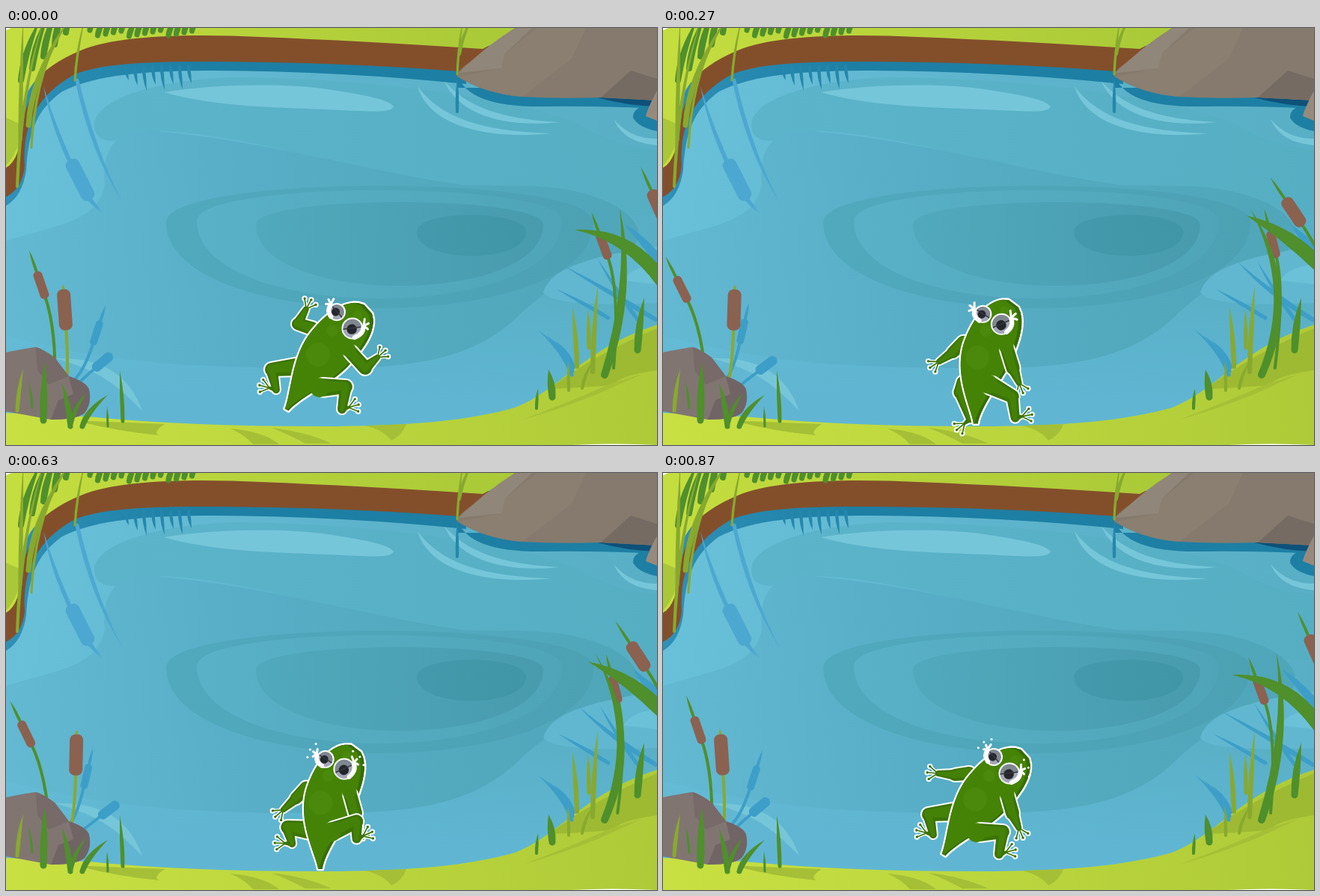
Write an HTML page with a canvas that moves like this. It is 870 px wide and 558 px high and loops after 900 ms.

```html
<!DOCTYPE html>
<html lang="en">
<head>
<meta charset="utf-8">
<title>Frog at the pond</title>
<style>
html, body { margin: 0; width: 100%; height: 100%; overflow: hidden; }
canvas { display: block; }
</style>
</head>
<body>
<canvas id="stage" width="870" height="558"></canvas>
<script>
const W = 870, H = 558, LOOP = 900, STEP = 30, LAST = LOOP - STEP;
const LEAF = '#4f8f2c', OLIVE = '#88a92f', CATTAIL = '#8b6150', MIRROR = '#3d9fc8', FAINT = '#4ca8d1';
const RAD = Math.PI / 180;
const stage = document.getElementById('stage').getContext('2d');
let g = stage;

const mix = (a, b, k) => a + (b - a) * k;
const mixAll = (a, b, k) => a.map((v, i) => mix(v, b[i], k));
const polar = (x, y, r, a) => [x + r * Math.cos(a), y + r * Math.sin(a)];
const ease = (from, to, t) => {
  const u = Math.min(1, Math.max(0, (t - from) / (to - from)));
  return u * u * (3 - 2 * u);
};

function ramp(x0, y0, x1, y1, ...colors) {
  const grad = g.createLinearGradient(x0, y0, x1, y1);
  colors.forEach((c, i) => grad.addColorStop(i / (colors.length - 1), c));
  return grad;
}

function fill(d, color) {
  g.fillStyle = color;
  g.fill(new Path2D(d));
}

function disc(x, y, r, color) {
  g.fillStyle = color;
  g.beginPath();
  g.arc(x, y, r, 0, 7);
  g.fill();
}

function curve(x, y, cx, cy, tx, ty, w, color) {
  g.strokeStyle = color;
  g.lineWidth = w;
  g.lineCap = 'round';
  g.beginPath();
  g.moveTo(x, y);
  g.quadraticCurveTo(cx, cy, tx, ty);
  g.stroke();
}

// Leaf with a round base, a full belly and a sharp tip.
function blade(x, y, cx, cy, tx, ty, w, color) {
  const a = Math.atan2(cy - y, cx - x), b = Math.atan2(ty - y, tx - x) + Math.PI / 2;
  const dx = Math.cos(b) * w * .75, dy = Math.sin(b) * w * .75;
  g.fillStyle = color;
  g.beginPath();
  g.arc(x, y, w / 2, a + Math.PI / 2, a - Math.PI / 2);
  g.quadraticCurveTo(cx - dx, cy - dy, tx, ty);
  g.quadraticCurveTo(cx + dx, cy + dy, ...polar(x, y, w / 2, a + Math.PI / 2));
  g.fill();
}

const grass = (x, y, height, lean, w, color) =>
  blade(x, y, x + lean * .2, y - height * .5, x + lean, y - height, w, color);

function capsule(x, y, w, h, deg, color) {
  g.save();
  g.translate(x, y);
  g.rotate(deg * RAD);
  g.fillStyle = color;
  g.beginPath();
  g.roundRect(-w / 2, -h / 2, w, h, w * .42);
  g.fill();
  g.restore();
}

// Depth contour: a shallow arch above y and a deep bowl below it.
function pool(left, right, y, top, bottom, from, to) {
  const up = y - (y - top) / .75, down = y + (bottom - y) / .75;
  fill(`M${left} ${y}C${left} ${up} ${right} ${up} ${right} ${y}C${right} ${down} ${left} ${down} ${left} ${y}Z`,
    ramp(left, 0, right, 0, from, to));
}

function drawWater() {
  g.fillStyle = ramp(0, 100, 870, 300, '#6ac1da', '#5cb3cb', '#58afc5');
  g.fillRect(0, 0, W, H);
  g.fillStyle = ramp(0, 360, 0, 500, '#60b6d200', '#60b6d2');
  g.fillRect(0, 360, W, 198);
  fill('M118 130C118 95 200 70 300 66C500 66 690 98 760 126C800 150 830 158 870 163V250H640C500 200 350 145 210 138C170 137 165 151 140 151C125 150 118 142 118 130Z',
    ramp(118, 0, 870, 0, '#5cb4cb', '#56aec3'));
  fill('M0 285C65 264 125 260 132 208C126 150 160 130 210 139C350 152 500 195 610 210C690 213 740 205 805 233C860 260 850 290 825 305C750 330 725 350 690 380C630 442 550 456 420 455C240 455 140 448 0 412Z',
    ramp(0, 300, 850, 220, '#63b8d2', '#59afc8', '#53a9be', '#4fa6b9'));
  pool(214, 785, 260, 211, 375, '#51a9be', '#4ca1b3');
  pool(255, 743, 258, 217, 362, '#59b1c8', '#4fa5b7');
  pool(334, 718, 263, 233, 345, '#51a9bd', '#489bad');
  pool(549, 695, 273, 250, 305, '#449aac', '#4095a6');
  fill('M718 354C728 318 790 305 870 292V368Q730 374 718 354Z', '#61b7d0');
  fill('M825 338Q835 320 870 316V343Q845 340 825 338Z', '#6bc1d8');

  const glint = '#76c6d9';
  fill('M211 86C280 74 380 74 430 82C490 91 512 97 518 105C515 114 490 112 430 109C340 106 270 103 211 86Z', glint);
  fill('M550 78C580 118 630 138 728 141C640 150 565 130 550 78Z', glint);
  fill('M585 70C615 105 660 122 740 126C665 134 605 116 585 70Z', glint);
  fill('M812 122C828 140 845 148 870 148V157C840 154 822 144 812 122Z', glint);
  fill('M66 442C130 440 165 465 182 512C150 480 130 460 66 442Z', glint);
}

function drawFarShore() {
  const deep = '#1d7fa4';
  fill('M0 238Q22 225 27 190C30 140 40 110 75 85C120 62 190 57 280 57Q450 58 615 75V40H0Z', ramp(0, 0, 250, 0, '#2f91b8', deep));
  fill('M603 64C615 92 650 106 720 105Q790 104 870 108V80H603Z', deep);
  fill('M870 100Q837 104 838 120Q845 133 870 138Z', deep);
  fill('M790 93Q830 104 870 105V90Z', '#0e5179');
  for (let i = 0; i < 8; i++) grass(160 + i * 12, 52, -18 - i * 7 % 15, 4, 4, '#2687ad');
  fill('M0 226Q22 215 25 185C22 130 40 92 90 63C130 45 210 45 280 45Q450 46 605 58H690L640 20L300 0L60 20L0 180Z', '#834f2b');
  fill('M0 187Q20 176 22 125C17 90 40 55 100 30C150 8 260 8 340 12Q470 17 637 28L690 0H0Z',
    ramp(0, 0, 690, 0, '#c5de3f', '#b6d23b', '#a9c937'));
  fill('M0 120Q18 128 22 130Q18 165 0 184Z', '#a9c737');

  blade(98, 205, 65, 140, 50, 78, 5, FAINT);
  blade(103, 215, 111, 230, 128, 247, 6, FAINT);
  capsule(99, 203, 19, 60, -27, FAINT);
  blade(95, 70, 116, 165, 155, 232, 5, FAINT);
  grass(603, 112, 46, 0, 4, '#2687ad');

  fill('M603 61Q608 53 625 42L680 0H870V97L795 93Q740 95 690 92Q640 88 603 65Z', '#857a6d');
  fill('M605 60Q640 25 680 0H703L667 34L662 54Z', '#91867a');
  fill('M662 54L667 34L710 0H775L756 41L690 92Q640 88 605 65Z', '#8a7f71');
  fill('M795 93L835 57L870 68V97Z', '#756b62');
  fill('M855 118Q857 108 870 84V124Z', '#978a7d');

  for (let i = 0; i < 14; i++) grass(112 + i * 10.5, 3 + i * 7 % 9, 22, 10, 7, LEAF);
  for (let i = 0; i < 5; i++) grass(20 + i * 15, 70 - i * 16, 82 - i * 10, 26 - i * 4, 8, LEAF);
  blade(15, 212, 20, 80, 52, -15, 4, OLIVE);
  blade(30, 130, 35, 60, 90, -20, 7, OLIVE);
  blade(34, 160, 38, 70, 72, 10, 3, OLIVE);
  grass(19, 150, 160, 4, 5, OLIVE);
  grass(92, 70, 85, 14, 3, OLIVE);
  grass(603, 62, 75, 8, 3, OLIVE);
  grass(606, 35, 50, 18, 4, OLIVE);
}

function drawNearShore() {
  fill('M0 515Q60 518 110 520Q240 533 420 533C540 533 620 525 680 508C740 485 770 430 870 397V558H0Z',
    ramp(0, 540, 870, 470, '#c9e042', '#bbd63d', '#aeca38'));
  const shade = '#a5bf36';
  fill('M725 483Q790 435 870 402V458Q820 465 810 478Q760 482 725 483Z', '#9dba32');
  fill('M690 524Q750 502 810 475L850 463L790 490Q740 510 690 524Z', shade);
  fill('M110 526L212 530Q195 541 205 545Q150 540 100 527Z', shade);
  fill('M300 536Q345 540 365 557H330Q320 545 300 536ZM355 535Q400 540 435 556H400Q380 545 355 535ZM480 532L535 530Q530 545 515 552Q505 538 480 532Z', shade);
  fill('M755 558Q810 555 870 558ZM0 0H7L0 3Z', '#fff');
  for (let i = 0; i < 3; i++) grass(756 + i, 464 - i * 5, 60 - i * 12, -45 + i * 10, 5, MIRROR);
}

function drawFrontGrass() {
  fill('M0 434Q30 428 40 427Q50 430 65 441L84 466Q108 474 111 484Q115 502 105 515Q95 524 60 524L0 513Z', '#817572');
  fill('M40 427Q50 430 65 441L84 466L57 477L42 458Z', '#776a68');
  fill('M84 466Q108 474 111 484Q115 502 105 515Q95 524 60 524L70 498L90 490Z', '#716465');
  grass(15, 512, 56, 8, 5, OLIVE);
  grass(50, 525, 78, 2, 9, LEAF);
  grass(35, 508, 36, -5, 3, LEAF);
  grass(86, 533, 58, -11, 7, LEAF);
  grass(102, 533, 42, 34, 7, LEAF);
  grass(87, 530, 42, 20, 5, LEAF);
  grass(156, 526, 68, -4, 5, LEAF);
  grass(136, 533, 27, -1, 3, LEAF);

  grass(763, 453, 80, -6, 6, OLIVE);
  grass(784, 460, 116, 7, 6, OLIVE);
  grass(779, 428, 51, -1, 5, OLIVE);
  grass(752, 485, 40, -1, 4, OLIVE);
  grass(770, 482, 37, 15, 4, OLIVE);
  grass(844, 431, 70, 9, 9, LEAF);
  grass(730, 494, 37, -5, 9, LEAF);
  grass(709, 509, 27, 2, 4, LEAF);
}

// The head drifts sideways, tilts with the drift and pulls its stem along.
function cattail(x, y, w, h, tilt, spike, rootX, rootY, drift, stem, color = CATTAIL) {
  const deg = tilt + drift * .35, ux = -Math.sin(deg * RAD), uy = Math.cos(deg * RAD);
  x += drift;
  y += drift * Math.sin(deg * RAD) * .6;
  const along = d => [x + ux * d, y + uy * d];
  curve(...along(h / 2 - 4), ...along(h / 2 + 45), rootX + drift * .35, rootY, 4, stem);
  blade(...along(4 - h / 2), ...along(-h / 2 - spike / 2), ...along(-h / 2 - spike), 3.5, stem);
  capsule(x, y, w, h, deg, color);
}

function drawReeds(s) {
  cattail(121, 408, 10, 34, 18, 22, 85, 475, -18 * s, MIRROR, MIRROR);
  cattail(129, 447, 13, 32, 50, 1, 88, 490, 11 * s, MIRROR, MIRROR);
  blade(868, 390, 810, 355, 745 + 28 * s, 318 - 6 * s, 6, MIRROR);
  blade(805, 388, 775, 370, 735 + 4 * s, 349, 5, MIRROR);
  blade(844, 390, 818, 355, 790 + 5 * s, 308 + 5 * s, 5, MIRROR);
  blade(885, 330 - 35 * s, 860, 290, 826 + 16 * s, 262, 11, MIRROR);

  cattail(47, 344, 12, 38, -19, 30, 65, 480, -26 * s, LEAF);
  cattail(78.5, 377, 18, 55, -4, 6, 81, 480, 20 * s, OLIVE);
  cattail(871, 237, 17, 44, -24, 34, 905, 345, -34 * s, LEAF);
  cattail(799, 292, 12, 37, -20, 30, 812, 455, 20 * s, LEAF);
  blade(884, 350 - 30 * s, 840, 276, 760 + 24 * s, 270 - 23 * s, 17, LEAF);
  blade(800, 464, 838 + 14 * s, 350, 820 - 43 * s, 241, 10, LEAF);
}

function taper(x, y, r, x2, y2, r2, color) {
  const a = Math.atan2(y2 - y, x2 - x), q = Math.PI / 2;
  g.fillStyle = color;
  g.beginPath();
  g.arc(x, y, r, a + q, a - q);
  g.arc(x2, y2, r2, a - q, a + q);
  g.fill();
}

function drawLimb([x, y], [kx, ky, ex, ey, aim], [a, b, c], foot, merge) {
  const angle = aim * RAD, spread = foot ? .65 : .85;
  const [px, py] = polar(ex, ey, foot, angle);
  const digits = [-spread, 0, spread].map(k => polar(px, py, 14, angle + k));
  const layer = (grow, color) => {
    taper(x, y, a + grow, kx, ky, b + 1 + grow, color);
    taper(kx, ky, b + grow, ex, ey, c + grow, color);
    taper(ex, ey, c - 1 + grow, px, py, 2 + grow, color);
    for (const [dx, dy] of digits) {
      curve(px, py, px, py, dx, dy, 1.7 + grow * 1.3, color);
      disc(dx, dy, 1.7 + grow, color);
    }
  };
  layer(2, '#fff');
  layer(0, '#3b7406');
  if (merge) disc(...polar(x, y, 5, Math.atan2(y - ky, x - kx)), a + 1, '#458306');
  taper(x - 1, y - 1, a * .7, kx - 1, ky - 1, b * .65, '#448107');
  taper(kx, ky, b * .6, ex, ey, c * .5, '#448107');
}

// A kick adds the stretch to a tucked pose that follows the lean.
const leg = (upright, leaning, stretch, lean, kick) =>
  mixAll(upright, leaning, lean).map((v, i) => v + stretch[i] * kick);

function arm(x, y, length, aim) {
  return [x, y, ...polar(x, y, length, aim * RAD), aim];
}

// Outline built around a curved spine: tapering tail, broad back, round head.
function bodyPath(lean) {
  const [x0, y0, x1, y1, x2, y2] = mixAll([375, 511, 424, 430, 484, 376], [428, 531, 417, 437, 465, 367], lean);
  const left = [], right = [], neck = .58, tailY = y0 + 16 * lean * (1 - lean);
  for (let i = 0; i <= 40; i++) {
    const u = i / 40, v = 1 - u;
    const x = v * v * x0 + 2 * u * v * x1 + u * u * x2;
    const y = v * v * tailY + 2 * u * v * y1 + u * u * y2;
    const a = Math.atan2(mix(y1 - tailY, y2 - y1, u), mix(x1 - x0, x2 - x1, u));
    const width = u < neck ? 3 + 31 * Math.sin(u / neck * Math.PI / 2) ** 1.3
      : 34 * Math.sqrt(1 - ((u - neck) / .43) ** 2.5);
    left.push(polar(x, y, width, a - Math.PI / 2));
    right.unshift(polar(x, y, width, a + Math.PI / 2));
  }
  const path = new Path2D();
  for (const p of left.concat(right)) path.lineTo(...p);
  path.closePath();
  return path;
}

function drawBody(lean) {
  const body = bodyPath(lean);
  g.lineJoin = 'round';
  g.strokeStyle = '#fff';
  g.lineWidth = 4.5;
  g.stroke(body);
  g.save();
  g.clip(body);
  g.fillStyle = '#376c05';
  g.fill(body);
  g.translate(-5, 1);
  g.fillStyle = '#458306';
  g.fill(body);
  g.restore();
  disc(417 + 4 * lean, 437 + 5 * lean, 16, '#4a890b');
  disc(436 - 6 * lean, 405, 8, '#4a890b');
  disc(470 - 17 * lean, 384 - 7 * lean, 6, '#4a890b');
}

function drawEye(x, y, r, tilt) {
  disc(x, y, r + 1, '#fff');
  disc(x, y, r - 1, '#7f8790');
  g.save();
  g.translate(x, y);
  g.rotate(tilt);
  g.fillStyle = '#a2a7b8';
  g.beginPath();
  g.arc(0, 0, r - 1, 0, Math.PI);
  g.fill();
  disc(-1, 1, r * .5, '#25262b');
  g.fillStyle = '#34373c';
  g.fillRect(1 - r, -1.2, 2 * r - 2, 1.5);
  g.restore();
}

function drawTear(x, y, r, angle, side, phase) {
  const spray = phase > 2;
  const start = polar(x, y, r - 1, angle + side * 1.65);
  const end = polar(x, y, r + 1, angle + side * .2);
  curve(...start, ...polar(x, y, r + 3, angle + side * .8), ...end, 6, '#fff');
  for (const k of [-.35, 0, .35]) {
    const reach = r + (spray ? 6 : 7 + phase) + (k ? 0 : 2);
    curve(...end, ...polar(x, y, r + 4, angle + k * .4), ...polar(x, y, reach, angle + k), 3, '#fff');
    if (spray) disc(...polar(x, y, r + 8 + phase, angle + k * 1.3), 1.5, '#fff');
  }
}

function drawFrog(t, step) {
  const u = t / LAST, peak = .55;
  const lean = 1 - ((u - peak) / (u < peak ? peak : 1 - peak)) ** 2;
  const kick = ease(0, 240, t) * (1 - ease(440, 590, t));
  const sweep = ease(80, 300, t);

  const leftLeg = leg([355, 457, 361, 484, 195], [380, 477, 386, 498, 180], [22, 14, 29, 28, -42], lean, kick);
  const rightLeg = leg([454, 480, 449, 510, -15], [471, 464, 472, 486, -26], [-1, 26, 3, 31, 13], lean, kick);
  const leftArm = arm(390 - 3 * lean, mix(396, 441, lean) + 8 * sweep * (1 - lean), 22, -61 - 114 * sweep - 55 * lean);
  const rightArm = arm(480 - 13 * sweep, 455, 21, -41 + 108 * sweep + 8 * lean);

  drawLimb(mixAll([393, 453], [406, 482], lean), leftLeg, [12, 8, 5], 9);
  drawLimb(mixAll([409, 402], [400, 425], lean), leftArm, [9, 7, 4], 1);
  drawBody(lean);
  drawLimb([461 - lean, 434 - 4 * lean], rightArm, [9, 8, 4], 1, true);
  drawLimb(mixAll([424, 481], [442, 478], lean), rightLeg, [12, 8, 6], 9, true);

  const [lx, ly, rx, ry] = mixAll([442, 380, 463, 402], [424, 383.5, 450, 395], lean);
  const turn = -.35 * lean, phase = step % 8;
  drawEye(lx, ly, 11, .85 + turn);
  drawEye(rx, ry, 13.5, -.12 + turn);
  drawTear(lx, ly, 11, -2.15 - .5 * lean, -1, phase);
  drawTear(rx, ry, 13.5, -.3 - .42 * lean, 1, phase);
}

const backdrop = document.createElement('canvas');
backdrop.width = W;
backdrop.height = H;
g = backdrop.getContext('2d');
drawWater();
drawFarShore();
drawNearShore();
g = stage;

function render(now) {
  const step = Math.floor(now % LOOP / STEP), t = step * STEP;
  g.drawImage(backdrop, 0, 0);
  drawReeds(Math.sin(Math.PI * t / LAST));
  drawFrontGrass();
  drawFrog(t, step);
}

const begin = performance.now();
function tick() {
  render(performance.now() - begin);
  requestAnimationFrame(tick);
}
tick();
</script>
</body>
</html>
```
